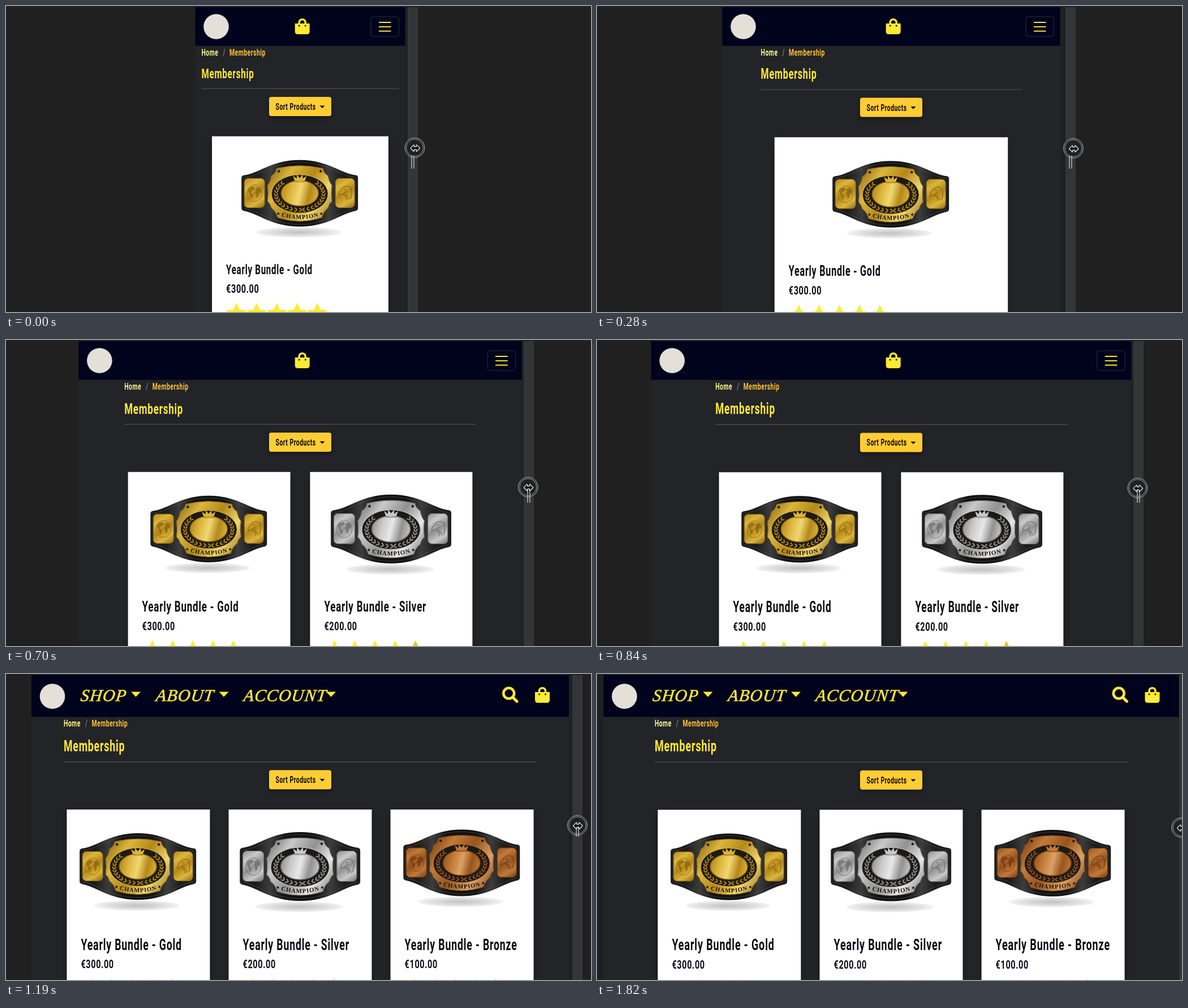
An HTML page with a canvas that plays this animation: 1034x542 px, repeating every 1890 ms.

```html
<!DOCTYPE html>
<html lang="en">
<head>
<meta charset="utf-8">
<title>Responsive shop page</title>
<style>
  html, body { margin: 0; width: 100%; height: 100%; overflow: hidden; background: #202021; }
  canvas { display: block; width: 1034px; height: 542px; }
</style>
</head>
<body>
<canvas id="stage" width="1034" height="542"></canvas>
<script>
const g = document.getElementById('stage').getContext('2d');
const LOOP = 1890, STEP = 70, ZOOM = 0.894, MID = 520;
const YELLOW = '#ffeb32', NAVY = '#00031c';

// time, half page width, handle x, pointer x, pointer y
const KEYS = [
  [0, 185.5, 710, 722.5, 251],
  [280, 298.5, 828, 842, 252],
  [490, 351, 873.5, 881.5, 258],
  [560, 359, 882, 890, 259],
  [840, 424.3, 948, 955.5, 262],
  [1120, 464, 990, 999, 267],
  [1190, 475, 1001, 1010, 268],
  [1470, 508.5, 1029, 1033, 271],
  [1820, 508.5, 1029, 1033, 272]
];

const PRODUCTS = [
  { name: 'Gold', price: '€300.00', scale: 1, dx: 0, dy: 101, last: YELLOW,
    tones: ['#8a6412', '#dcb63c', '#b58819', '#f0d771', '#94701a'] },
  { name: 'Silver', price: '€200.00', scale: 1.033, dx: 0.5, dy: 101, last: '#f0c419',
    tones: ['#6c6c6c', '#c9c9c9', '#919191', '#e8e8e8', '#757575'] },
  { name: 'Bronze', price: '€100.00', scale: 1, dx: 0, dy: 94.5, last: '#f0c419',
    tones: ['#70390f', '#c27a38', '#96541f', '#dda066', '#7a4114'] }
];

const LEATHER = new Path2D('M-99-32C-72-35-50-59 0-59S72-35 100-32Q103-31 103-27V26Q103 30 99 31C72 36 50 59 0 59S-72 36-99 31Q-103 30-103 26V-27Q-103-31-99-32Z');
const STITCH = new Path2D('M-97-28C-70-31-48-55 0-55S70-31 98-28M-97 27C-70 32-48 55 0 55S70 32 98 27');
const PLATE = new Path2D('M-41-44Q0-54 41-44Q42-36 50-31Q52-20 57-14Q55 0 57 14Q52 18 50 26Q42 32 39 43Q0 56-39 43Q-42 32-50 26Q-52 18-57 14Q-55 0-57-14Q-52-20-50-31Q-42-36-41-44Z');
const CROWN = new Path2D('M-9 5L-12-4L-5.5 1L-5-6L0 0L5-6L5.5 1L12-4L9 5Z');
const GLOBE = new Path2D('M-11-8Q-6-13-1-12L1-8L-4-5L-7-1L-3 2L-4 8L-6 10L-8 2L-11-2ZM2-9L8-11L12-5L10 0L8-2L7 5L4 9L3 2L1-2L3-5Z');
const EAGLE = new Path2D('M-11 4Q-8-12 5-13Q13-11 12 0L10 10M-11 4L-4 1Q1 0 2-4M-4 1Q3 4 3 12M2 2L8 11M-3-7H2');
const BAG = new Path2D('M-13-5H-7.3V-7A7.3 7 0 0 1 7.3-7V-5H13V9Q13 14 8 14H-8Q-13 14-13 9ZM-3.7-5H3.7V-7A3.7 3.5 0 0 0-3.7-7Z');
const ARROW = new Path2D('M-7.5 0L-2.5-5V-2H2.5V-5L7.5 0L2.5 5V2H-2.5V5Z');

function pose(t) {
  let i = 0;
  while (i < KEYS.length - 2 && t >= KEYS[i + 1][0]) i++;
  const a = KEYS[i], b = KEYS[i + 1];
  const p = Math.min(1, (t - a[0]) / (b[0] - a[0]));
  return a.map((v, j) => v + (b[j] - v) * p).slice(1);
}

function at(x, y, draw, scale = 1) {
  g.save();
  g.translate(x, y);
  g.scale(scale, scale);
  draw();
  g.restore();
}

function rect(x, y, w, h, fill, r = 0) {
  g.fillStyle = fill;
  g.beginPath();
  g.roundRect(x, y, w, h, r);
  g.fill();
}

function oval(x, y, rx, ry, fill, stroke, width = 1) {
  g.beginPath();
  g.ellipse(x, y, rx, ry, 0, 0, Math.PI * 2);
  if (fill) { g.fillStyle = fill; g.fill(); }
  if (stroke) { g.strokeStyle = stroke; g.lineWidth = width; g.stroke(); }
}

function star(x, y, r, fill) {
  g.fillStyle = fill;
  g.beginPath();
  for (let i = 0; i < 10; i++) {
    const a = i * Math.PI / 5, d = i % 2 ? r * 0.48 : r;
    g.lineTo(x + d * Math.sin(a), y - d * Math.cos(a));
  }
  g.fill();
}

function caret(x, y, w, h, fill) {
  g.fillStyle = fill;
  g.beginPath();
  g.moveTo(x, y);
  g.lineTo(x + w, y);
  g.lineTo(x + w / 2, y + h);
  g.fill();
}

function lines(points, color, width) {
  g.strokeStyle = color;
  g.lineWidth = width;
  g.beginPath();
  for (const [x1, y1, x2, y2] of points) {
    g.moveTo(x1, y1);
    g.lineTo(x2, y2);
  }
  g.stroke();
}

// Tall condensed lettering
function label(text, x, y, size, color, k = 0.64) {
  at(x, y, () => {
    g.scale(k, 1);
    g.font = `600 ${size * 1.14}px Roboto, sans-serif`;
    g.letterSpacing = `${size * 0.034 / k}px`;
    g.fillStyle = color;
    g.fillText(text, 0, 0);
  });
}

// Slanted calligraphic lettering
function script(text, x, y) {
  at(x, y, () => {
    g.transform(1, 0, -0.12, 1, 0, 0);
    g.font = 'italic 30px "Liberation Serif", serif';
    g.letterSpacing = '1.2px';
    g.fillStyle = g.strokeStyle = YELLOW;
    g.lineWidth = 0.6;
    g.fillText(text, 0, 0);
    g.strokeText(text, 0, 0);
  });
}

function metal(tones, x1, y1, x2, y2) {
  const m = g.createLinearGradient(x1, y1, x2, y2);
  tones.forEach((c, i) => m.addColorStop(i / (tones.length - 1), c));
  return m;
}

function arcText(text, y, radius) {
  g.font = 'bold 10.5px "Liberation Serif", serif';
  g.letterSpacing = '0px';
  g.fillStyle = '#17120a';
  const widths = [...text].map(c => g.measureText(c).width + 1);
  let x = -widths.reduce((a, b) => a + b) / 2;
  [...text].forEach((c, i) => {
    const a = (x + widths[i] / 2) / radius;
    g.save();
    g.translate(radius * Math.sin(a), y - radius * (1 - Math.cos(a)));
    g.rotate(-a);
    g.fillText(c, -widths[i] / 2 + 0.5, 0);
    g.restore();
    x += widths[i];
  });
}

function belt(tones) {
  const [dark, light, mid, shine] = tones;
  at(-2, 69, () => {
    g.scale(1, 0.12);
    const s = g.createRadialGradient(0, 0, 5, 0, 0, 76);
    s.addColorStop(0, '#c4c4c4');
    s.addColorStop(0.6, '#dedede');
    s.addColorStop(1, '#f4f4f4');
    oval(0, 0, 75, 75, s);
  });
  g.fillStyle = metal(['#202020', '#1a1a1a', '#3c3c3c', '#121212', '#121212', '#121212', '#3c3c3c', '#1a1a1a', '#202020'], -103, 0, 103, 0);
  g.fill(LEATHER);
  g.strokeStyle = '#555';
  g.lineWidth = 0.6;
  g.stroke(STITCH);

  for (const side of [-1, 1]) {
    const w = side < 0 ? 36 : 34;
    const x = side < 0 ? -98 : 63;
    rect(x, -26.5, w, 52, metal([mid, light, mid, light, dark], x, -26, x + w, 26), 7);
    g.strokeStyle = dark;
    g.lineWidth = 1;
    g.stroke();
    at(x + w / 2, 0, () => {
      g.globalAlpha = 0.75;
      if (side < 0) {
        oval(0, 0, 13, 15, null, dark);
        g.fillStyle = dark;
        g.fill(GLOBE);
      } else {
        g.strokeStyle = dark;
        g.lineWidth = 1.6;
        g.stroke(EAGLE);
      }
    });
  }

  g.fillStyle = metal(tones, -58, -40, 58, 40);
  g.fill(PLATE);
  g.strokeStyle = dark;
  g.lineWidth = 1;
  g.stroke(PLATE);
  oval(0, 1, 50, 34, '#1d1a16', light);
  // laurel
  for (let i = -12; i <= 12; i++) {
    const a = Math.PI / 2 + i * 0.195;
    for (const d of [-0.55, 0.55]) {
      g.save();
      g.translate(42 * Math.cos(a), 1 + 28.5 * Math.sin(a));
      g.rotate(a + Math.PI / 2 + d + (i < 0 ? Math.PI : 0));
      oval(0, d * 4, 3.2, 1.1, mid);
      g.restore();
    }
  }
  oval(0, 0, 33, 22.5, metal([mid, light, shine, mid, light], -33, -8, 33, 8), dark, 1.5);
  at(0, -27, () => {
    g.fillStyle = light;
    g.fill(CROWN);
    rect(-9, 6, 18, 1.5, mid);
  });
  for (const s of [-1, 1]) {
    star(s * 37, -39, 3.2, '#17120a');
    star(s * 38, 36, 2.8, '#17120a');
  }
  arcText('CHAMPION', 45.5, 115);
}

function card(item, x, y, w, size, grow) {
  g.save();
  g.shadowColor = 'rgba(0,0,0,.45)';
  g.shadowBlur = 9;
  g.shadowOffsetY = 4;
  rect(x, y, w, 330, '#fff');
  g.restore();
  at(x + w / 2 - 0.8 + item.dx, y + item.dy, () => belt(item.tones), item.scale);
  label('Yearly Bundle - ' + item.name, x + 25, y + 244.4 + grow, size, '#0a0a16');
  label(item.price, x + 25, y + 277.2 + grow, 17.9, '#0a0a16', 0.71);
  for (let i = 0; i < 5; i++) {
    star(x + 43 + i * 35.8, y + 314 + grow, 19, i < 4 ? YELLOW : item.last);
  }
}

function bag(x, y) {
  at(x, y, () => {
    g.fillStyle = YELLOW;
    g.fill(BAG, 'evenodd');
    oval(-5.5, -1, 1.4, 1.4, NAVY);
    oval(5.5, -1, 1.4, 1.4, NAVY);
  });
}

function navbar(left, right, wide) {
  rect(left, 2, right - left, wide ? 74 : 68.5, NAVY);
  oval(left + 37, wide ? 39.5 : 36.5, 22.3, 22.3, '#e4e0d8');
  if (!wide) {
    bag(MID + 3.7, 36);
    g.strokeStyle = '#2c2e35';
    g.lineWidth = 1;
    g.beginPath();
    g.roundRect(right - 60.5, 19, 49.5, 35, 4);
    g.stroke();
    lines([29, 36.7, 44.4].map(y => [right - 46.5, y, right - 25, y]), YELLOW, 2);
    return;
  }
  for (const [text, x, arrow] of [['SHOP', 86, 176], ['ABOUT', 219, 331.5], ['ACCOUNT', 374, 521]]) {
    script(text, left + x, 47.7);
    caret(left + arrow, 31.5, 17, 9, YELLOW);
  }
  const x = right - 106.3;
  oval(x, 34.2, 9.4, 9.4, null, YELLOW, 4.5);
  g.lineCap = 'round';
  lines([[x + 8, 42.2, x + 14.3, 48.5]], YELLOW, 5);
  g.lineCap = 'butt';
  bag(right - 47, 37);
}

function page(half) {
  const left = MID - half, right = MID + half;
  const view = half * 2 / ZOOM;
  const wide = view >= 992;
  const cols = wide ? 3 : view >= 768 ? 2 : 1;
  const box = view < 576 ? view : cols === 3 ? 960 : cols === 2 ? 720 : 540;
  const row = box * ZOOM;
  const x = MID - row / 2 + 11;
  const size = (20.8 + view * 0.006) * ZOOM;
  const grow = size * 1.2 - 25;
  const top = wide ? 5 : 0;
  const y = top + grow;

  rect(left, 2, right - left, 540, '#232428');
  navbar(left, right, wide);

  label('Home', x, 88 + top, 14.3, '#fff88c');
  label('/', x + 38, 88 + top, 14.3, '#7a7f86');
  label('Membership', x + 49.5, 88 + top, 14.3, '#ffc233');
  label('Membership', x, 127.6 + y, size, YELLOW);
  rect(x, 145.8 + y, row - 22, 1, '#58595c');

  g.save();
  g.shadowColor = 'rgba(0,0,0,.4)';
  g.shadowBlur = 6;
  g.shadowOffsetY = 3;
  rect(465, 161 + y, 110, 34, '#ffcd33', 4);
  g.restore();
  label('Sort Products', 476.5, 184 + y, 14.3, '#0b0b0b');
  caret(554.5, 176.5 + y, 9, 4.6, '#0b0b0b');

  const w = cols === 3 ? 253 : cols === 2 ? 287 : row * 0.9 - 22;
  const pitch = row / cols;
  for (let i = 0; i < cols; i++) {
    const mid = MID + (i - (cols - 1) / 2) * pitch;
    card(PRODUCTS[i], mid - w / 2, 230.8 + y, w, size, grow);
  }
}

function pointer(handle, x, y) {
  rect(handle, 2, 18, 540, '#323639');
  oval(x, y, 17.3, 17.3, '#202124', '#bdbdbd', 1);
  oval(x, y, 15, 15, null, '#9a9a9a', 1);
  lines([7, 11].map(d => [handle + d, 265, handle + d, 288]), '#c9cacb', 1.3);
  at(x + 0.8, y + 0.8, () => {
    g.lineJoin = 'round';
    g.strokeStyle = '#f2f2f2';
    g.lineWidth = 2.4;
    g.stroke(ARROW);
    g.fillStyle = '#111';
    g.fill(ARROW);
  });
}

function render(time) {
  const t = Math.floor(time % LOOP / STEP) * STEP;
  const [half, handle, x, y] = pose(t);
  rect(0, 0, 1034, 542, '#202021');
  page(half);
  // the handle's grip leaves the stage once the page is fully open
  pointer(handle, x, y);
}

function tick() {
  render(performance.now());
  requestAnimationFrame(tick);
}
tick();
</script>
</body>
</html>
```
